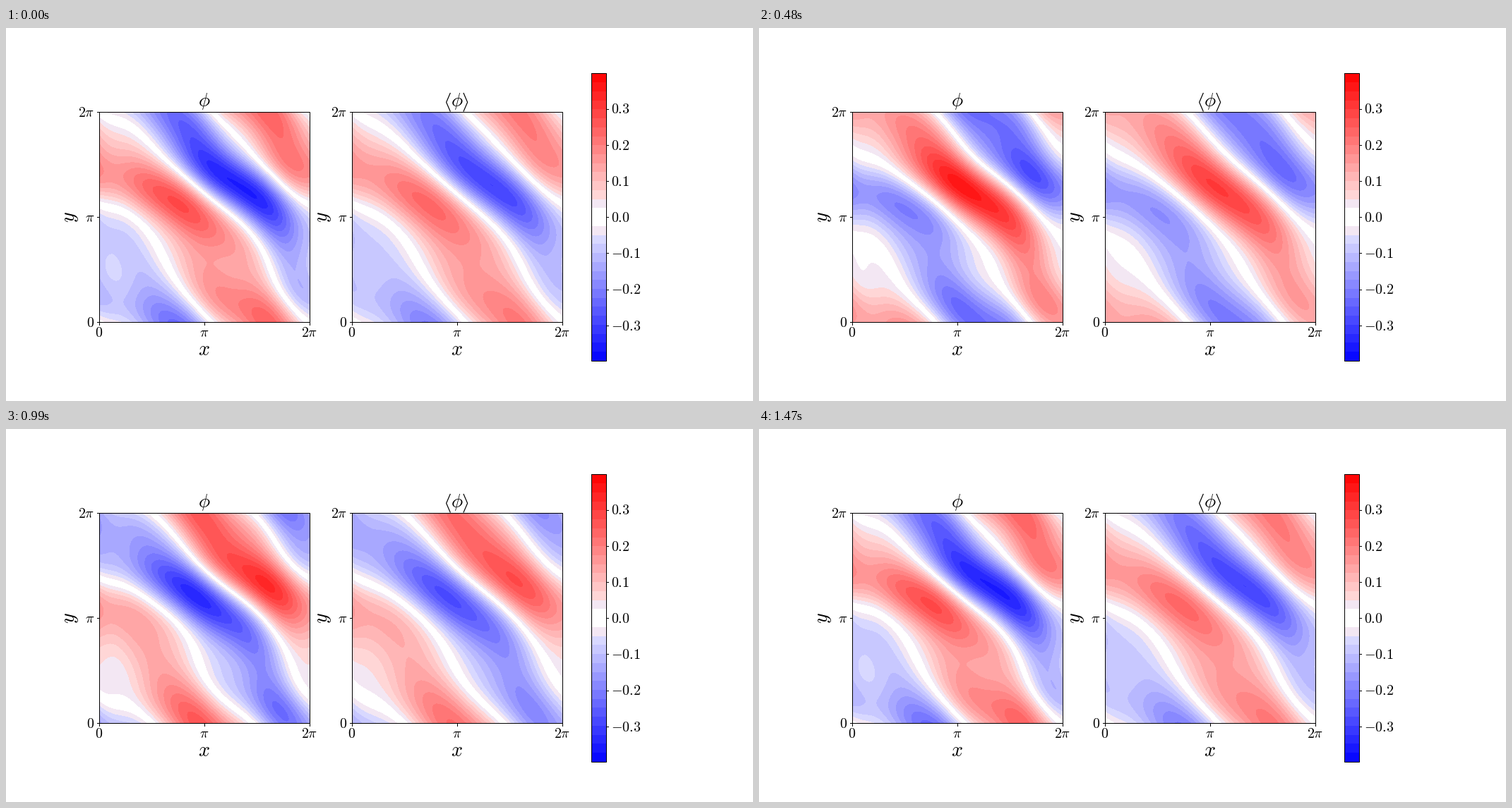
Write a matplotlib script that moves like this. It is 1058 px wide and 529 px high and loops after 1.5 s.

```python
import numpy as np
import matplotlib.pyplot as plt
from matplotlib.animation import FuncAnimation
from matplotlib.patches import Rectangle

plt.rcParams["mathtext.fontset"] = "cm"

W, H, DPI = 1058, 529, 100
PX = 72 / DPI                      # points per pixel
FRAMES, INTERVAL = 50, 30
PEAK, BANDS = 0.3977, 32
GYRORADIUS = 0.42
LEFT, RIGHT, TOP, BOTTOM, SIDE = 132.25, 490.05, 119.07, 417.22, 298.16
BAR_X, BAR_W, BAR_TOP, BAR_BOTTOM = 829.2, 20.4, 64.48, 471.81

# The wave: complex amplitude of each plane wave (kx, ky), all turning at one frequency.
MODES = {
    (1, 1): 0.0887 + 0.1830j,
    (1, 2): -0.0578 + 0.0144j,
    (2, 1): -0.0475 - 0.0220j,
    (2, 2): 0.0198 - 0.0136j,
    (1, 3): 0.0238 - 0.0017j,
    (3, 1): -0.0230 - 0.0007j,
    (2, 3): -0.0068 + 0.0088j,
    (3, 2): -0.0037 + 0.0060j,
    (0, 1): -0.0016 - 0.0100j,
    (1, 4): 0.0020 + 0.0064j,
    (4, 1): -0.0037 - 0.0077j,
}

grid = np.linspace(0, 2 * np.pi, 101)
X, Y = np.meshgrid(grid, grid)


def bessel_j0(z):
    return np.mean(np.cos(z * np.sin(np.arange(32) * np.pi / 16)))


def wave(radius):
    """Complex potential averaged over rings of the given radius."""
    return sum(amp * bessel_j0(radius * np.hypot(kx, ky)) * np.exp(1j * (kx * X + ky * Y))
               for (kx, ky), amp in MODES.items())


panels = [(LEFT, wave(0)), (RIGHT, wave(GYRORADIUS))]

levels = np.linspace(-PEAK, PEAK, BANDS + 1)
colors = [plt.get_cmap("bwr")((i + 0.5) / BANDS) for i in range(BANDS)]
mid = BANDS // 2
colors[mid - 1] = colors[mid] = (1, 1, 1)
colors[mid - 2] = colors[mid + 1] = (243 / 255, 231 / 255, 243 / 255)

fig = plt.figure(figsize=(W / DPI, H / DPI), dpi=DPI, facecolor="white")
ax = fig.add_axes([0, 0, 1, 1])
ax.set_xlim(0, W)
ax.set_ylim(H, 0)
ax.axis("off")


def label(x, y, text, size=20, ha="center", va="baseline", rotation=0):
    ax.text(x, y, f"${text}$", fontsize=size * PX, ha=ha, va=va,
            rotation=rotation, zorder=4)


def line(xs, ys, width=1):
    ax.plot(xs, ys, color="black", lw=width * PX, zorder=3)


def box(x, y, w, h):
    ax.add_patch(Rectangle((x, y), w, h, fill=False, ec="black", lw=PX, zorder=3))


def draw_panel(x0):
    box(x0, TOP, SIDE, BOTTOM - TOP)
    for part, text in ((0, "0"), (0.5, r"\pi"), (1, r"2\pi")):
        x = x0 + part * SIDE
        y = BOTTOM + part * (TOP - BOTTOM)
        line([x, x], [BOTTOM, BOTTOM + 3.5])
        line([x0 - 3.5, x0], [y, y])
        label(x - 0.7, 438, text)
        label(x0 - 6.8, y + 6.8, text, ha="right")
    center = x0 + SIDE / 2 - 0.5
    label(center, 464.5, "x", 28)
    label(x0 - 41, (TOP + BOTTOM) / 2, "y", 28, va="center", rotation=90)
    label(center, 111.5, r"\phi", 27)
    return center


def draw_brackets(center):
    for side in (-1, 1):
        line([center + side * d for d in (9.5, 15, 9.5)], [92.5, 105.3, 118], 1.2)


def draw_colorbar():
    edges = np.linspace(BAR_BOTTOM, BAR_TOP, BANDS + 1)
    for low, high, color in zip(edges, edges[1:], colors):
        ax.add_patch(Rectangle((BAR_X, high), BAR_W, low - high, fc=color,
                               lw=0, antialiased=False, zorder=1))
    box(BAR_X, BAR_TOP, BAR_W, BAR_BOTTOM - BAR_TOP)
    end = BAR_X + BAR_W
    for tenth in range(-3, 4):
        y = (BAR_TOP + BAR_BOTTOM - (BAR_BOTTOM - BAR_TOP) * tenth / 10 / PEAK) / 2
        line([end, end + 3.5], [y, y])
        label(end + 7, y + 6.8, f"{tenth / 10:.1f}", ha="left")


draw_panel(LEFT)
draw_brackets(draw_panel(RIGHT))
draw_colorbar()
contours = []


def update(frame):
    while contours:
        contours.pop().remove()
    turn = np.exp(-2j * np.pi * frame / (FRAMES - 1))
    part = grid / (2 * np.pi)
    for x0, potential in panels:
        field = np.clip((potential * turn).real, -0.999 * PEAK, 0.999 * PEAK)
        contours.append(ax.contourf(x0 + part * SIDE, BOTTOM + part * (TOP - BOTTOM),
                                    field, levels=levels, colors=colors, zorder=1))
    return contours


animation = FuncAnimation(fig, update, frames=FRAMES, interval=INTERVAL,
                          init_func=lambda: [], repeat=True, repeat_delay=0, blit=False)
plt.show()
```
